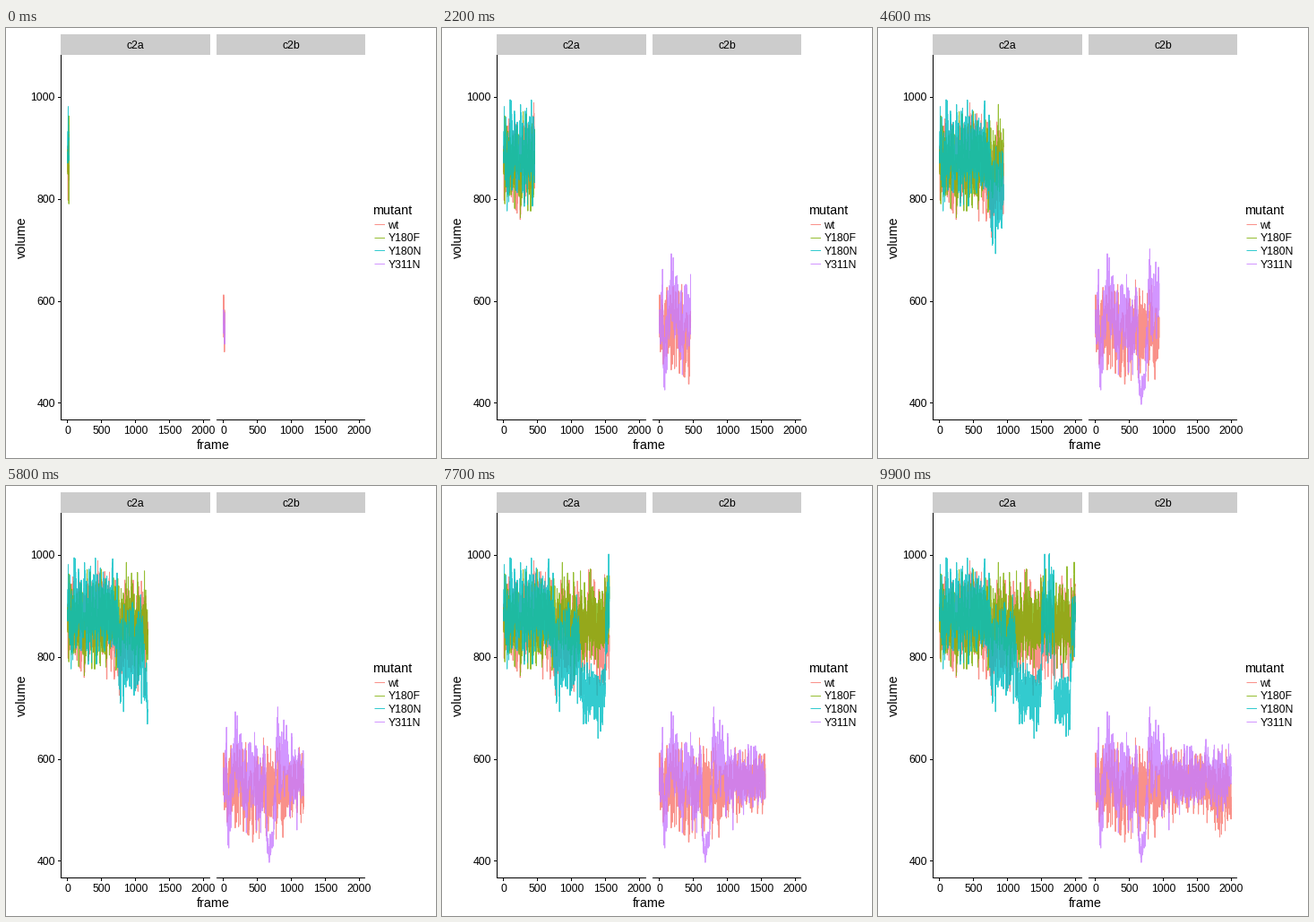
A matplotlib script that plays this animation: 480 by 480 pixels, repeating every 10000 ms.

```python
import numpy as np
import matplotlib.pyplot as plt
from matplotlib.animation import FuncAnimation
from matplotlib.patches import Rectangle

SIZE, DPI = 480, 80
PT = 72 / DPI                      # points per pixel
FRAMES, STEP = 100, 20             # samples revealed per frame
T = np.arange(FRAMES * STEP)
PANELS = {"c2a": (61, 167), "c2b": (235, 166)}   # left edge, width
TOP, BOTTOM = 30, 437
COLORS = {"wt": "#F8766D", "Y180F": "#7CAE00",
          "Y180N": "#00BFC4", "Y311N": "#C77CFF"}
ALPHA = 0.8

plt.rcParams["font.family"] = "Liberation Sans"
fig = plt.figure(figsize=(SIZE / DPI, SIZE / DPI), dpi=DPI, facecolor="white")
ax = fig.add_axes([0, 0, 1, 1])
ax.set(xlim=(0, SIZE), ylim=(SIZE, 0))
ax.axis("off")


def px(t, panel):
    return PANELS[panel][0] + 7.8 + t * 0.0757


def py(v):
    return 77 + (1000 - v) * 0.57


def mid(p):
    """Centre of the pixel holding p."""
    return np.floor(p) + 0.5


def label(x, y, text, size=12.2, ha="center", rot=0):
    ax.text(x, y, text, fontsize=size * PT, ha=ha, va="baseline",
            rotation=rot, rotation_mode="anchor")


def rule(xs, ys, color="black", alpha=1):
    ax.plot(xs, ys, color=color, alpha=alpha, lw=PT,
            solid_capstyle="butt", snap=False)


def draw_axes():
    for name, (left, width) in PANELS.items():
        ax.add_patch(Rectangle((left, 7), width, 23, fc="#CCCCCC", lw=0))
        label(left + width / 2, 23, name)
        rule([left, left + width], [BOTTOM + 0.5] * 2)
        for t in range(0, 2001, 500):
            x = px(t, name)
            rule([mid(x)] * 2, [BOTTOM, BOTTOM + 4])
            label(x, 453, str(t))
    rule([61.5] * 2, [TOP, BOTTOM + 1])
    for v in range(400, 1001, 200):
        y = py(v)
        rule([58, 61.5], [mid(y)] * 2)
        label(55, y + 4.3, str(v), ha="right")
    label(231.5, 470, "frame", 14.4)
    label(21.5, 234, "volume", 14.4, rot=90)


def draw_legend():
    label(409.5, 208, "mutant", 14.4, "left")
    for i, (name, color) in enumerate(COLORS.items()):
        y = 219.5 + 14.6 * i
        rule([411.5, 423], [mid(y)] * 2, color, ALPHA)
        label(426.4, y + 4.3, name, ha="left")


def plateau(start, end, ramp=12):
    """Smooth 0-1-0 window over time."""
    return (np.tanh((T - start) / ramp) - np.tanh((T - end) / ramp)) / 2


def noise(rng):
    """Fast jitter plus a slow wander, about unit variance."""
    kernel = np.exp(-np.linspace(-2.5, 2.5, 31) ** 2)
    kernel /= np.sqrt((kernel ** 2).sum())
    wander = np.convolve(rng.normal(size=T.size + 30), kernel, "valid")
    return np.clip(0.78 * rng.normal(size=T.size) + 0.62 * wander, -3, 3)


def series(panel, mutant, seed, level, spread, *phases):
    """Noise around a level; each phase is (start, end, shift, spread factor)."""
    mean = np.full(T.size, float(level))
    sd = np.full(T.size, float(spread))
    for start, end, shift, factor in phases:
        window = plateau(start, end)
        mean += shift * window
        sd *= 1 + (factor - 1) * window
    values = mean + sd * noise(np.random.default_rng(seed))
    line, = ax.plot([], [], color=COLORS[mutant], alpha=ALPHA, lw=PT,
                    solid_capstyle="butt", solid_joinstyle="round")
    return line, px(T, panel), py(values)


draw_axes()
draw_legend()
curves = [
    series("c2a", "wt", 1, 880, 41, (720, 2100, -32, 1)),
    series("c2a", "Y180F", 2, 875, 37),
    series("c2a", "Y180N", 3, 885, 39, (745, 1500, -75, 1),
           (1130, 1510, -85, 0.72), (1690, 1945, -165, 0.72)),
    series("c2b", "wt", 4, 540, 34, (-100, 40, 35, 0.8),
           (1000, 2100, 12, 0.75), (1680, 2100, -15, 1.25)),
    series("c2b", "Y311N", 5, 555, 33, (-100, 45, 30, 0.9),
           (60, 125, -35, 1), (140, 280, 45, 1), (626, 745, -125, 0.38),
           (780, 940, 50, 1), (1100, 2100, 5, 0.8)),
]


def update(k):
    n = (k + 1) * STEP
    for line, x, y in curves:
        line.set_data(x[:n], y[:n])
    return [c[0] for c in curves]


anim = FuncAnimation(fig, update, frames=FRAMES, interval=100,
                     repeat=True, repeat_delay=0, blit=False)
plt.show()
```
